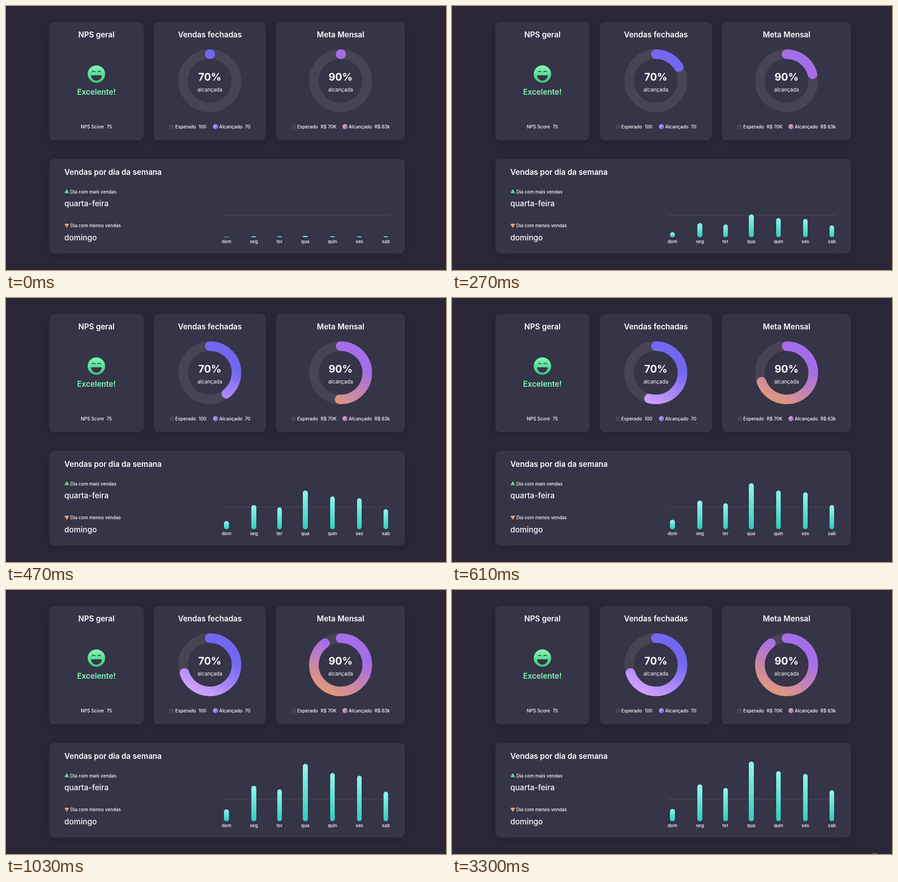
An HTML page for the animation above (3370 ms loop, 965 by 580 pixels).

```html
<!DOCTYPE html>
<html lang="pt-BR">
<head>
<meta charset="utf-8">
<title>Painel de vendas</title>
<style>
  html, body { margin: 0; width: 100%; height: 100%; overflow: hidden; background: #2b2737; }
  body { --t: 0; }
  svg { display: block; position: absolute; left: 0; top: 0; }
  text { font-family: Inter, sans-serif; font-size: 10px; font-weight: 500; fill: #fff; }
  .title { font-size: 16.8px; font-weight: 600; }
  .day { font-size: 17px; }
  .big { font-size: 22.4px; font-weight: 700; }
  .note { font-size: 11.2px; font-weight: 400; }
  .mid { text-anchor: middle; }
  .card {
    position: absolute; background: #363447; border-radius: 11px;
    box-shadow: 0 4px 15px rgba(0, 0, 0, .2);
  }
  .track, .arc { fill: none; stroke-width: 21; }
  .track { stroke: #484454; }
  .arc {
    stroke-linecap: round;
    animation: sweep 1s ease-in-out paused both;
    animation-delay: calc(var(--t) * -1ms);
  }
  .bar {
    position: absolute; bottom: 0; width: 10.6px; margin-left: -5.3px;
    height: var(--h); border-radius: 5.3px;
    background: linear-gradient(#90f7ec, #32ccbc);
    animation: grow 1.417s ease paused both;
    animation-delay: calc(var(--t) * -1ms);
  }
  #bars { position: absolute; left: 0; top: 0; width: 965px; height: 508px; }
  @keyframes sweep { from { stroke-dasharray: 0 1000; } to { stroke-dasharray: var(--deg) 1000; } }
  @keyframes grow { from { height: .5px; } }
</style>
</head>
<body>
<div class="card" style="left:94.5px;top:34.5px;width:207.5px;height:260px"></div>
<div class="card" style="left:324px;top:34.5px;width:245.7px;height:260px"></div>
<div class="card" style="left:592px;top:34.5px;width:283px;height:260px"></div>
<div class="card" style="left:94.5px;top:336px;width:780.5px;height:207.5px"></div>

<svg width="965" height="580" viewBox="0 0 965 580">
  <defs>
    <linearGradient id="green" x2="0" y2="1"><stop stop-color="#81fbb8"/><stop offset="1" stop-color="#3cc57c"/></linearGradient>
    <linearGradient id="orange" x2="0" y2="1"><stop stop-color="#f6a973"/><stop offset="1" stop-color="#e5966f"/></linearGradient>
    <linearGradient id="violet" gradientUnits="userSpaceOnUse" x1="14.3" y1="-27.2" x2="-29" y2="55.2"><stop stop-color="#7367f0"/><stop offset="1" stop-color="#ce9ffc"/></linearGradient>
    <linearGradient id="sunset" gradientUnits="userSpaceOnUse" x1="14.3" y1="-27.2" x2="-29" y2="55.2"><stop stop-color="#a66de9"/><stop offset="1" stop-color="#df9780"/></linearGradient>
    <linearGradient id="violetDot" x2="1" y2=".6"><stop offset=".15" stop-color="#ce9ffc"/><stop offset="1" stop-color="#7367f0"/></linearGradient>
    <linearGradient id="sunsetDot" x2="1" y2=".6"><stop offset=".2" stop-color="#f0b080"/><stop offset=".9" stop-color="#a66de9"/></linearGradient>
    <path id="ring" pathLength="360" d="M0-58.5a58.5 58.5 0 1 1 0 117a58.5 58.5 0 1 1 0-117"/>
  </defs>

  <text class="title mid" x="198.3" y="69">NPS geral</text>
  <circle cx="198.3" cy="149.6" r="19.1" fill="url(#green)"/>
  <path d="M186.7 152.3h23.2a11.6 11.6 0 0 1-23.2 0z" fill="#363447"/>
  <path d="M188.7 145.6a3.5 3.5 0 0 1 6.8 0M201.1 145.6a3.5 3.5 0 0 1 6.8 0" fill="none" stroke="#363447" stroke-width="1.6"/>
  <text class="title mid" x="198.3" y="195" style="fill:#81fbb8">Excelente!</text>
  <text x="164" y="268.5">NPS Score</text><text x="220.7" y="268.5">75</text>

  <text class="title mid" x="447.2" y="69">Vendas fechadas</text>
  <g transform="translate(447 164.3)">
    <use href="#ring" class="track"/>
    <use href="#ring" class="arc" stroke="url(#violet)" style="--deg:252"/>
  </g>
  <text class="big mid" x="447" y="163.5">70%</text>
  <text class="note mid" x="447.1" y="188">alcançada</text>
  <circle cx="363.8" cy="265" r="5.5" fill="#484454"/>
  <text x="371.3" y="268.5">Esperado</text><text x="422.5" y="268.5">100</text>
  <circle cx="459.6" cy="265" r="5.5" fill="url(#violetDot)"/>
  <text x="467.5" y="268.5">Alcançado</text><text x="524" y="268.5">70</text>

  <text class="title mid" x="733.8" y="69">Meta Mensal</text>
  <g transform="translate(733.8 164.3)">
    <use href="#ring" class="track"/>
    <use href="#ring" class="arc" stroke="url(#sunset)" style="--deg:324"/>
  </g>
  <text class="big mid" x="733.7" y="163.5">90%</text>
  <text class="note mid" x="733.8" y="188">alcançada</text>
  <circle cx="631" cy="265" r="5.5" fill="#484454"/>
  <text x="638.8" y="268.5">Esperado</text><text x="690.3" y="268.5">R$ 70K</text>
  <circle cx="743.5" cy="265" r="5.5" fill="url(#sunsetDot)"/>
  <text x="751.5" y="268.5">Alcançado</text><text x="808.2" y="268.5">R$ 63k</text>

  <text class="title" x="128" y="371">Vendas por dia da semana</text>
  <path d="M128 411.5l5.3-9 5.3 9z" fill="url(#green)"/>
  <text x="141" y="411.5">Dia com mais vendas</text>
  <text class="day" x="128" y="440">quarta-feira</text>
  <path d="M128 478.5h10.6l-5.3 9z" fill="url(#orange)"/>
  <text x="141" y="486">Dia com menos vendas</text>
  <text class="day" x="128" y="515">domingo</text>

  <path d="M473 459.4H842" stroke="#484454" stroke-width="1.6"/>
  <g id="days"></g>
  <circle id="pointer" cx="927" cy="590.9" r="13" fill="#7f7a35" visibility="hidden"/>
</svg>
<div id="bars"></div>

<script>
  const week = [
    ['dom', 483.5, 27], ['seg', 543.7, 81], ['ter', 599.8, 73], ['qua', 656.3, 131],
    ['quin', 716, 110], ['sex', 775.1, 104], ['sab', 833.2, 68]
  ];
  const byId = id => document.getElementById(id);
  byId('days').innerHTML = week.map(([day, x]) =>
    `<text class="mid" x="${x}" y="520.6">${day}</text>`).join('');
  byId('bars').innerHTML = week.map(([, x, h]) =>
    `<div class="bar" style="left:${x}px;--h:${h}px"></div>`).join('');

  const LOOP = 3370;
  const HOLD = 68.8;     // how long each picture stays
  const ADVANCE = 67;    // how far the motion moves per picture
  const FIRST = 45;      // motion already under way at the start
  const pointer = byId('pointer');
  const start = performance.now();

  // The picture advances in steps, as a screen recording does.
  function draw() {
    const t = (performance.now() - start) % LOOP;
    const step = Math.floor((t + 12) / HOLD);
    document.body.style.setProperty('--t', step ? (step + 1) * ADVANCE : FIRST);
    pointer.setAttribute('visibility', t >= 3300 ? 'visible' : 'hidden');
    requestAnimationFrame(draw);
  }
  draw();
</script>
</body>
</html>
```
